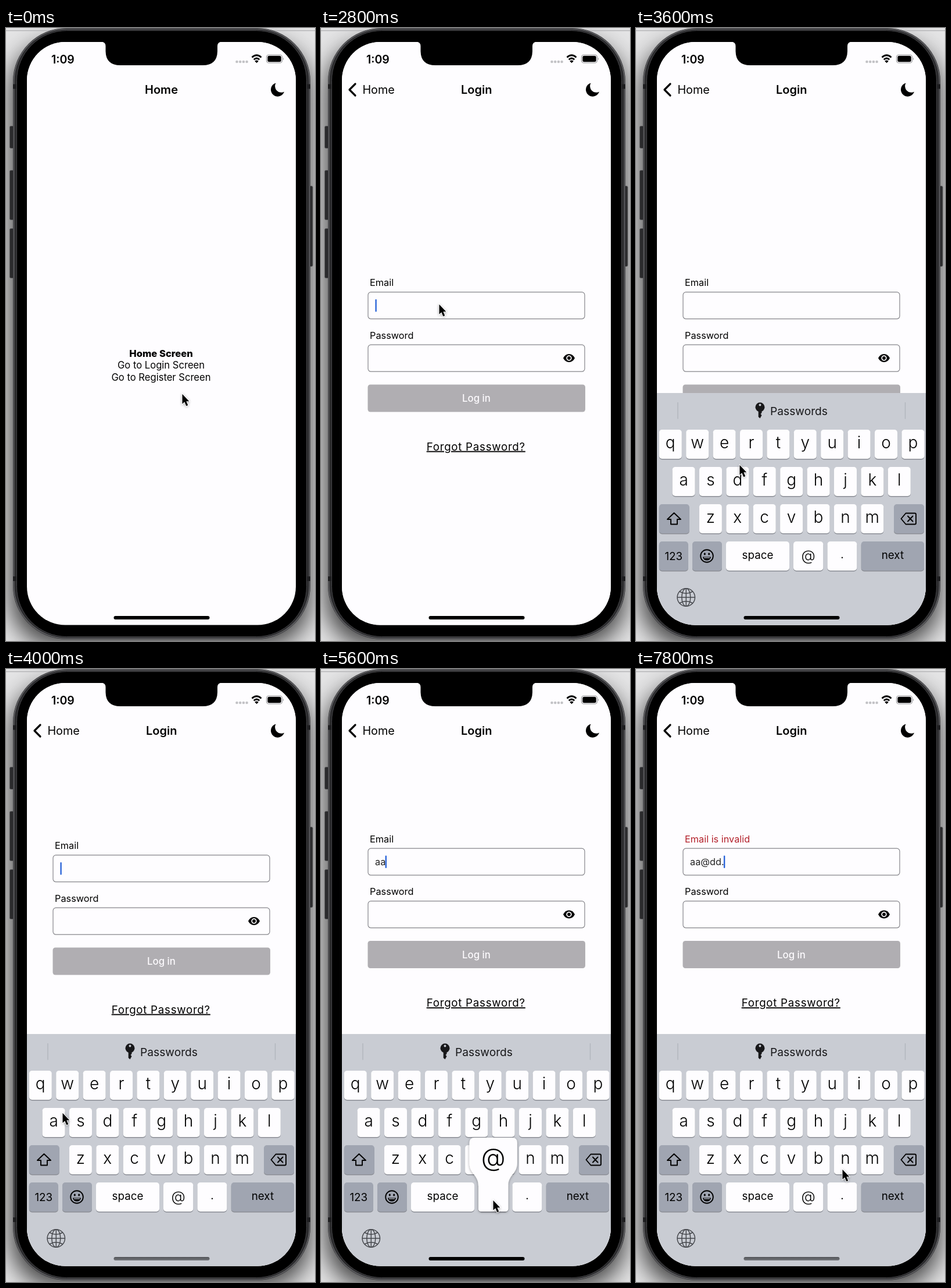
Animation, 532 px wide and 1053 px high, one loop 8 s. Source, as an HTML page:

```html
<!DOCTYPE html>
<html lang="en">
<head>
<meta charset="utf-8">
<title>Login form</title>
<style>
html, body { margin: 0; width: 100%; height: 100%; overflow: hidden; background: #dededf; }
svg { display: block; width: 100vw; height: 100vh; font-family: Inter, "Noto Sans", sans-serif; font-size: 16.3px; }
.mid { text-anchor: middle; }
.bar { font-size: 20px; font-weight: 600; }
.back { font-size: 19.8px; }
.body { font-size: 16.6px; }
.link { font-size: 18.7px; letter-spacing: .74px; text-decoration: underline; text-decoration-thickness: 1.3px; }
.field { fill: #fefdff; stroke: #85858a; stroke-width: 1.2; }
.line { fill: none; stroke: #000; stroke-linecap: round; stroke-linejoin: round; }
.letter { font-size: 28px; font-weight: 350; }
.word { font-size: 18.8px; }
#big { font-size: 43px; font-weight: 300; }
</style>
</head>
<body>
<svg viewBox="0 0 532 1053" preserveAspectRatio="none">
  <defs>
    <clipPath id="glass"><rect x="36" y="24" width="463" height="1001.5" rx="66"/></clipPath>
    <filter id="blur" x="-30%" y="-20%" width="160%" height="140%"><feGaussianBlur stdDeviation="20"/></filter>
    <filter id="soft" x="-30%" y="-30%" width="160%" height="160%">
      <feDropShadow dx="0" dy="1" stdDeviation="2" flood-opacity=".35"/>
    </filter>
    <linearGradient id="grey" x2="0" y2="1">
      <stop offset="0" stop-color="#505256"/><stop offset="1" stop-color="#77797e"/>
    </linearGradient>
  </defs>

  <!-- desktop and phone body -->
  <rect width="532" height="1053" fill="#e4e4e5"/>
  <rect x="8" y="26" width="516" height="1036" rx="80" fill="#000" opacity=".72" filter="url(#blur)"/>
  <path d="M0 4.5H532" stroke="#b4b4b6" stroke-width="1.5"/>
  <g fill="#2b2b2d" stroke="#59595b">
    <rect x="6.5" y="168.5" width="8" height="38" rx="2"/>
    <rect x="6.5" y="244.5" width="8" height="85" rx="2"/>
    <rect x="6.5" y="344.5" width="8" height="85" rx="2"/>
    <rect x="520.5" y="271.5" width="7.5" height="138" rx="2"/>
  </g>
  <rect x="12" y="0" width="512" height="1050" rx="92" fill="#2a2a2c"/>
  <rect x="13.5" y="1.5" width="509" height="1047" rx="90.5" fill="none" stroke="#5b5b5e" stroke-width="2"/>
  <path d="M12 100.5H19M517 100.5H524M12 946H19M517 946H524" stroke="#1d1d1f" stroke-width="8"/>
  <rect x="18.5" y="4.5" width="499" height="1041" rx="86" fill="#000" stroke="#434346"/>

  <g clip-path="url(#glass)">
    <rect x="36" y="24" width="463" height="1002" fill="#fefdff"/>
    <g id="home" class="mid body">
      <text x="267" y="565" font-weight="800">Home Screen</text>
      <text x="267" y="585.3">Go to Login Screen</text>
      <text x="267" y="605.5">Go to Register Screen</text>
    </g>
    <rect id="dim" x="36" y="132" width="463" height="894"/>

    <g id="login">
      <rect x="36" y="132" width="463" height="894" fill="#fefdff"/>
      <g id="form">
        <text id="label" x="84" y="443">Email</text>
        <rect class="field" x="81" y="453.7" width="373" height="46" rx="5"/>
        <text id="email" x="93" y="482.5" fill="#222"></text>
        <rect id="caret" y="466" width="2.4" height="21.5" rx="1" fill="#2b65d9"/>
        <text x="84" y="533.5">Password</text>
        <rect class="field" x="81" y="544.2" width="373" height="46" rx="5"/>
        <path d="M417 567Q420.5 560 427 560T437 567Q433.5 574 427 574T417 567Z"/>
        <circle cx="427" cy="567" r="4.7" fill="#fefdff"/>
        <circle cx="427" cy="567" r="2.9"/>
        <rect x="80.5" y="612.5" width="374.5" height="47" rx="4.5" fill="#b0aeb2"/>
        <text class="mid" x="267.5" y="642" font-size="16.8" font-weight="500" fill="#fdfbfe">Log in</text>
        <text class="link" x="181.7" y="725.7">Forgot Password?</text>
      </g>
    </g>

    <!-- header -->
    <rect x="36" y="24" width="463" height="108" fill="#fefdff"/>
    <text id="homeTitle" class="mid bar" x="267.5" y="113">Home</text>
    <text id="loginTitle" class="mid bar" x="267.7" y="113">Login</text>
    <path id="chevron" class="line" d="M59 96L49 106L59 116" stroke-width="3.2"/>
    <text id="back" class="back" x="71.4" y="113">Home</text>
    <path d="M464.5 94.5A11.8 11.8 0 1 0 479 109.5A10.9 10.9 0 0 1 464.5 94.5Z"/>
    <text x="78" y="60.5" font-size="19.5" font-weight="600">1:09</text>
    <g fill="#c3c3c6">
      <circle cx="397.5" cy="58" r="2.3"/><circle cx="403.2" cy="58" r="2.3"/>
      <circle cx="408.9" cy="58" r="2.3"/><circle cx="414.6" cy="58" r="2.3"/>
    </g>
    <path d="M423.5 50.5Q431.5 43 439.5 50.5M426.7 54.2Q431.5 49.8 436.3 54.2" fill="none" stroke="#000" stroke-width="2.8"/>
    <path d="M428.2 56.8Q431.5 54 434.8 56.8L431.5 60.3Z"/>
    <rect x="448.5" y="46" width="27" height="14" rx="4.3" fill="none" stroke="#99999c" stroke-width="1.2"/>
    <rect x="450.3" y="47.8" width="23.4" height="10.4" rx="2.7"/>
    <path d="M477 50.5Q479.2 53 477 55.5Z" fill="#99999c"/>

    <!-- keyboard -->
    <g id="keyboard">
      <rect x="36" y="627" width="463" height="400" fill="#c9ccd3"/>
      <path d="M72 643V671.5M463.5 643V671.5" stroke="#b0b4bb" stroke-width="1.3"/>
      <circle cx="213.5" cy="651.3" r="8" fill="#18181a"/>
      <path d="M210.7 657H216.5V661L214.6 663L216.5 665.2L213.6 670.5L210.7 668Z" fill="#18181a"/>
      <circle cx="213.5" cy="647.5" r="1.9" fill="#c9ccd3"/>
      <text class="mid" x="280.5" y="664.5" font-size="19.2" fill="#18181a">Passwords</text>
      <g id="keys"></g>
      <path class="line" d="M65.5 833L77 844H71V852.5H60V844H54Z" stroke-width="1.9"/>
      <path class="line" d="M456.5 843L464.5 833.5H480Q482 833.5 482 835.5V850.5Q482 852.5 480 852.5H464.5ZM468 838.5L476.5 847.5M476.5 838.5L468 847.5" stroke-width="1.9"/>
      <circle class="line" cx="122" cy="907" r="10.8" stroke-width="1.9"/>
      <ellipse cx="118.3" cy="903.5" rx="1.5" ry="2.1"/><ellipse cx="125.7" cy="903.5" rx="1.5" ry="2.1"/>
      <path d="M115 908.5H129Q128 914.5 122 914.5T115 908.5Z"/>
      <path d="M117 910H127" stroke="#a0a5b1" stroke-width="1.4"/>
      <g fill="none" stroke="#46484d" stroke-width="1.5">
        <circle cx="86.3" cy="978" r="15.2"/><ellipse cx="86.3" cy="978" rx="7.5" ry="15.2"/>
        <path d="M86.3 963V993M71 978H101.5M75 968Q86.3 974.5 97.6 968M75 988Q86.3 981.5 97.6 988"/>
      </g>
      <g id="popup">
        <path id="bubble" fill="#fefdff" filter="url(#soft)"/>
        <text id="big" class="mid"></text>
      </g>
    </g>
    <rect id="pill" x="185.5" y="1010" width="165" height="6" rx="3"/>
  </g>

  <path d="M164 23.5Q171.5 24 171.5 31V40Q172 64 197 64H338.5Q363.500 64 364 40V31Q364 24 371.500 23.500Z"/>
  <g id="pointer">
    <path d="M.5 .8V17.800L4.300 14.300L7.300 21.200L10.300 19.900L7.400 13.200H12.300Z" stroke="#fff" stroke-width="1.600" paint-order="stroke" filter="url(#soft)"/>
  </g>
</svg>
<script>
const $ = id => document.getElementById(id);
const NS = "http://www.w3.org/2000/svg";
const STEP = 200, STEPS = 40;
const keys = {};

function add(tag, attrs, text = "") {
  const el = document.createElementNS(NS, tag);
  for (const name in attrs) el.setAttribute(name, attrs[name]);
  el.textContent = text;
  return $("keys").appendChild(el);
}

function addKey(name, x, y, w, opts = {}) {
  const { dark = false, cls = "letter", dy = 31.5, style = "" } = opts;
  const box = { x, width: w, height: 50, rx: 5 };
  add("rect", { ...box, y: y + 1.4, fill: "#8b8e95" });
  add("rect", { ...box, y, fill: dark ? "#a0a5b1" : "#fefdff" });
  const label = add("text", { x: x + w / 2, y: y + dy, class: "mid " + cls, style }, name);
  keys[name] = { x, y, w, label };
}

[["qwertyuiop", 39.8, 690], ["asdfghjkl", 62.6, 754], ["zxcvbnm", 108.9, 818]].forEach(([row, x, y]) =>
  [...row].forEach((c, i) => addKey(c, x + i * 46.4, y, 39)));
const word = { cls: "word", dy: 30 };
addKey("", 39.8, 818, 52, { dark: true });
addKey("", 444, 818, 52, { dark: true });
addKey("123", 39.8, 882, 50, { ...word, dark: true, dy: 32 });
addKey("", 97, 882, 51, { dark: true });
addKey("space", 155, 882, 109, word);
addKey("@", 271, 882, 51.3, { dy: 33, style: "font-size:25px" });
addKey(".", 329.5, 882, 50.8, { ...word, dy: 29 });
addKey("next", 387.7, 882, 108.3, { ...word, dark: true });

// step, x, y
const track = [
  [0, 303, 628], [4, 273, 577], [6, 273, 577], [7, 275, 579], [8, 268, 570], [11, 202, 479],
  [12, 203, 474], [15, 203, 474], [18, 178, 750], [20, 97, 762], [21, 84, 778], [23, 84, 778],
  [25, 250, 886], [27, 296, 912], [28, 296, 912], [29, 292, 905], [32, 176, 782], [34, 176, 782],
  [36, 350, 905], [37, 352, 908], [38, 354, 900], [39, 355, 859]
];
const typed = [[0, ""], [22, "a"], [24, "aa"], [29, "aa@"], [33, "aa@d"], [35, "aa@dd"], [37, "aa@dd."]];
const pressed = { 21: "a", 23: "a", 28: "@", 32: "d", 34: "d", 37: "." };
const lift = [[0, 0], [19, -10], [20, -134], [21, -145.5]];

const held = (list, n) => list.filter(p => p[0] <= n).pop()[1];
const move = (id, x, y) => $(id).setAttribute("transform", `translate(${x} ${y})`);
const show = (id, on) => $(id).setAttribute("opacity", Math.max(0, Math.min(1, +on)));

function pointerAt(n) {
  const i = Math.max(1, track.findIndex(p => p[0] >= n));
  const [a, ax, ay] = track[i - 1], [b, bx, by] = track[i];
  const u = (n - a) / (b - a);
  return [ax + (bx - ax) * u, ay + (by - ay) * u];
}

// remaining part of the screen push, a critically damped spring
function pushLeft(n) {
  if (n < 6) return 1;
  if (n > 8) return 0;
  const a = 18.26 * ((n - 6) * STEP / 1000 + .079);
  return (1 + a) * Math.exp(-a);
}

function drawPopup(name) {
  show("popup", !!name);
  for (const k in keys) keys[k].label.setAttribute("opacity", k === name ? 0 : 1);
  if (!name) return;
  const { x, y, w } = keys[name], l = x - 15.5, r = x + w + 15.5, e = x + w, top = y - 77;
  $("bubble").setAttribute("d", `M${l + 9} ${top}H${r - 9}Q${r} ${top} ${r} ${top + 9}V${y - 34}
    C${r} ${y - 14} ${e} ${y - 14} ${e} ${y + 6}V${y + 45}Q${e} ${y + 50} ${e - 5} ${y + 50}
    H${x + 5}Q${x} ${y + 50} ${x} ${y + 45}V${y + 6}C${x} ${y - 14} ${l} ${y - 14} ${l} ${y - 34}
    V${top + 9}Q${l} ${top} ${l + 9} ${top}Z`);
  const big = $("big");
  big.textContent = name;
  big.setAttribute("x", x + w / 2);
  big.setAttribute("y", y - 28);
}

function draw(n) {
  const p = pushLeft(n), go = n >= 6;
  move("home", -139 * (1 - p), 0);
  show("dim", go ? .122 * (1 - p) : 0);
  move("login", 463 * p, 0);
  show("login", go);
  show("homeTitle", go ? (p - .1) / .9 : 1);
  move("homeTitle", -190 * (1 - p), 0);
  for (const id of ["loginTitle", "chevron", "back"]) show(id, go && 1.04 - p);
  move("loginTitle", 135 * p, 0);
  move("back", 115 * p, 0);

  move("form", 0, held(lift, n));
  const bad = n >= 31;
  $("label").textContent = bad ? "Email is invalid" : "Email";
  $("label").setAttribute("fill", bad ? "#b3202a" : "#000");
  const text = held(typed, n);
  $("email").textContent = text;
  $("caret").setAttribute("x", text ? 92.3 + $("email").getComputedTextLength() : 93.4);
  show("caret", n >= 14 && n !== 17 && n !== 18);

  show("keyboard", n >= 17);
  move("keyboard", 0, n === 17 ? 90 : 0);
  drawPopup(pressed[n]);
  const grey = (n >= 19 && n < 27) || n >= 31;
  $("pill").setAttribute("fill", grey ? "url(#grey)" : "#000");
  move("pointer", ...pointerAt(n));
}

let last = -1;
const start = performance.now();
function tick(now) {
  const n = Math.floor(Math.max(0, now - start) / STEP) % STEPS;
  if (n !== last) draw(last = n);
  requestAnimationFrame(tick);
}
draw(0);
requestAnimationFrame(tick);
</script>
</body>
</html>
```
